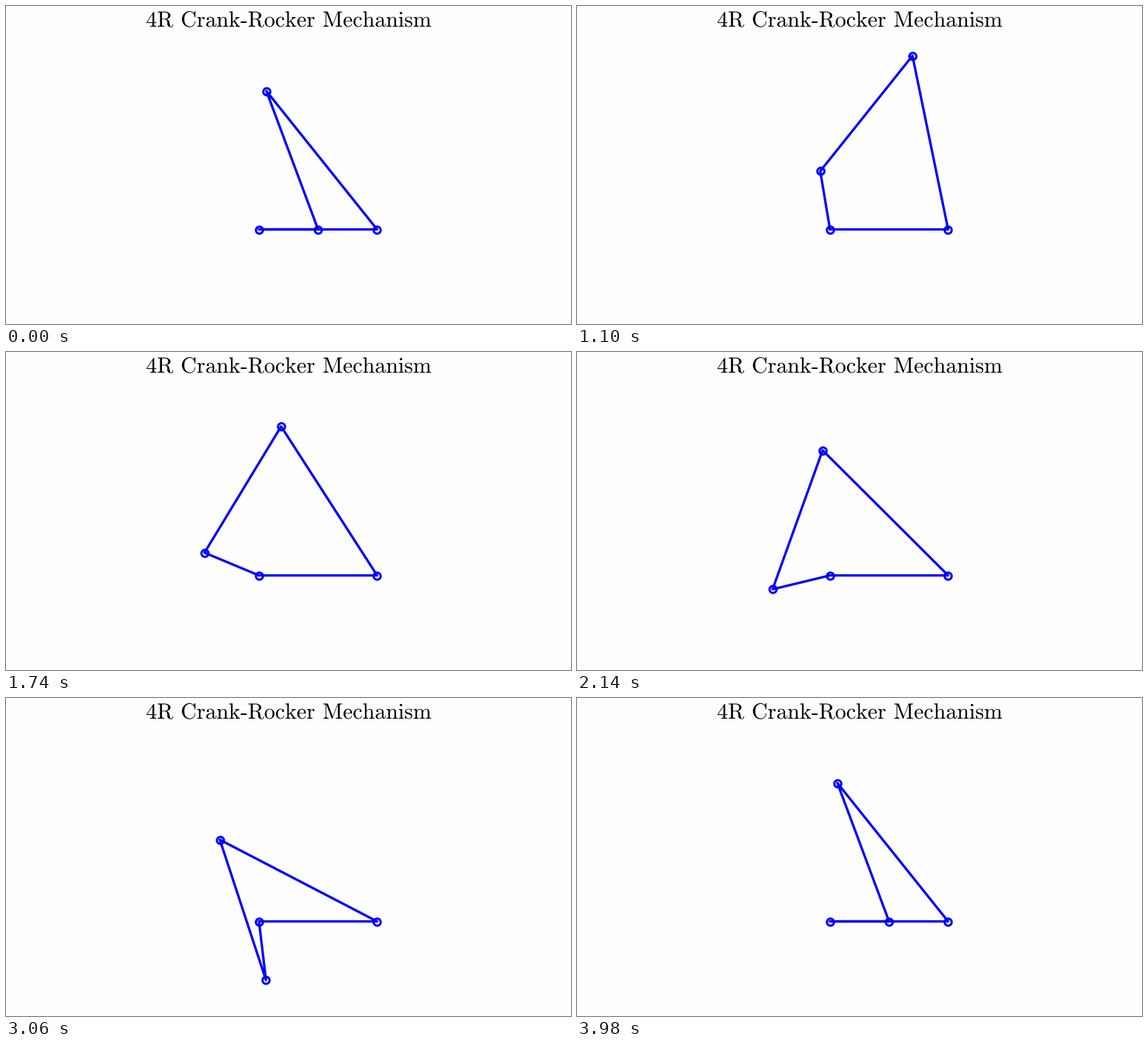
A matplotlib script for the animation above (4000 ms loop, 768 px wide and 432 px high).

```python
import numpy as np
import matplotlib.pyplot as plt
from matplotlib.animation import FuncAnimation
from matplotlib.patches import PathPatch, Rectangle
from matplotlib.textpath import TextPath

W, H, DPI = 768, 432, 100
FRAMES, INTERVAL = 200, 20
PX = 72 / DPI  # points per pixel

UNIT = 80.27  # pixels per unit of link length
CRANK, COUPLER, ROCKER, GROUND = 1.0, 2.5, 3.0, 2.0
O = np.array([343.9, H - 303.5])
C = O + [GROUND * UNIT, 0]

plt.rcParams["mathtext.fontset"] = "cm"
plt.rcParams["path.simplify"] = False

fig = plt.figure(figsize=(W / DPI, H / DPI), dpi=DPI, facecolor="#fefefe")
ax = fig.add_axes([0, 0, 1, 1])
ax.set_xlim(0, W)
ax.set_ylim(0, H)
ax.axis("off")


def draw_title(left, baseline, em):
    """Set the title in Computer Modern; offsets are in ems."""
    words = [("4R", 0), ("Crank", 1.569), ("Rocker", 4.6), ("Mechanism", 7.977)]
    for word, dx in words:
        path = TextPath((left + dx * em, baseline), rf"$\mathrm{{{word}}}$", size=em)
        ax.add_patch(PathPatch(path, fc="black", lw=0))
    ax.add_patch(Rectangle((left + 4.278 * em, baseline + 0.187 * em),
                           0.265 * em, 0.058 * em, fc="black", lw=0))


def joints(theta):
    """Return the four pivots of the linkage for a crank angle."""
    a = O + CRANK * UNIT * np.array([np.cos(theta), np.sin(theta)])
    span = C - a
    d = np.hypot(*span) / UNIT
    u = span / np.hypot(*span)
    along = (d**2 + COUPLER**2 - ROCKER**2) / (2 * d)
    height = np.sqrt(COUPLER**2 - along**2)
    b = a + UNIT * (along * u + height * np.array([-u[1], u[0]]))
    return np.array([O, a, b, C])


draw_title(190.2, H - 28.3, 30.1)
links, = ax.plot([], [], "-", color="blue", lw=3.3 * PX,
                 solid_capstyle="round", solid_joinstyle="round")
pins, = ax.plot([], [], "o", mfc="none", mec="blue",
                ms=9.6 * PX, mew=3.0 * PX, snap=False)


def update(i):
    pts = joints(2 * np.pi * i / (FRAMES - 1))
    links.set_data(*np.vstack([pts, pts[:1]]).T)
    pins.set_data(*pts.T)
    return links, pins


anim = FuncAnimation(fig, update, frames=FRAMES, interval=INTERVAL,
                     repeat=True, repeat_delay=0)
plt.show()
```
